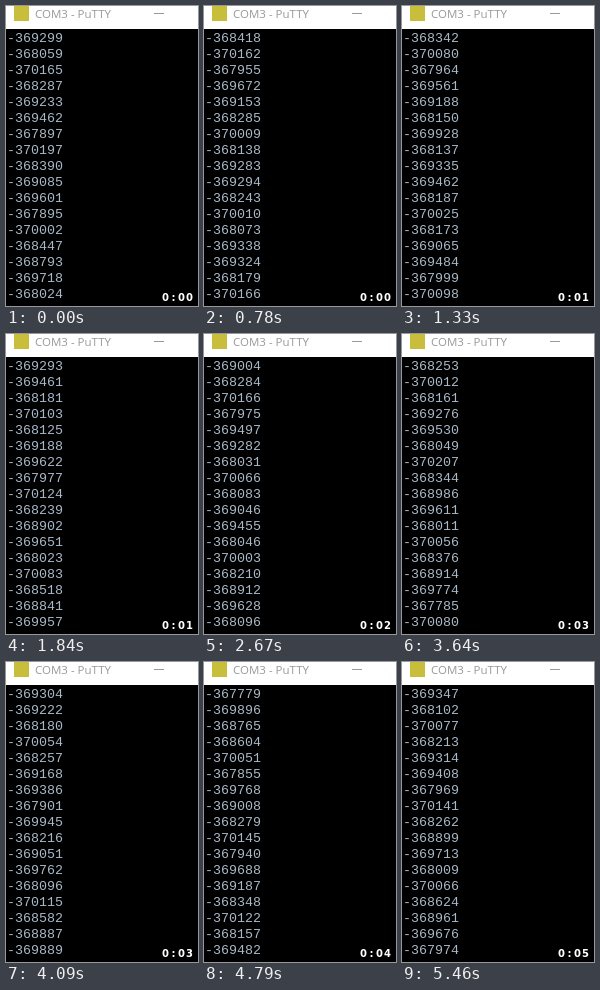
An HTML page for the animation above (5.56 s loop, 192 px wide and 300 px high).

```html
<!DOCTYPE html>
<html lang="en">
<head>
<meta charset="utf-8">
<title>Serial readout</title>
<style>
  html, body { margin: 0; width: 100%; height: 100%; overflow: hidden; background: #000; }
  svg { display: block; width: 192px; height: 300px; }
  text { white-space: pre; }
  .title { font: 11.5px "Open Sans", "Noto Sans", sans-serif; fill: #999; }
  .row { font: 13.333px "Liberation Mono", monospace; fill: #a9b8c6; }
  .clock { font: bold 10px "DejaVu Sans", sans-serif; fill: #fff; text-anchor: middle; }
</style>
</head>
<body>
<svg id="stage" viewBox="0 0 192 300">
  <rect width="192" height="300" fill="#000"/>
  <rect width="192" height="23" fill="#fff"/>
  <rect x="8" y="0" width="15" height="15" fill="#c9bd3c"/>
  <text class="title" x="29" y="12">COM3 - PuTTY</text>
  <rect x="148" y="7" width="10" height="1" fill="#999"/>
</svg>
<script>
const LOOP = 5560, STEP_MS = 30, LAST = 182, ROWS = 17;
const LINES_PER_MS = 0.08, CLOCK_MS = 1060, STALL_RATE = 0.1;

// Repeatable noise in [0, 1).
function noise(n) {
  const r = Math.sin(n * 12.9898 + 4.1) * 43758.5453;
  return r - Math.floor(r);
}

// Sensor value: mains hum aliased by the sample rate, plus noise.
function reading(n) {
  const hum = Math.cos(2 * Math.PI * (0.2 + 0.3945 * n));
  return Math.round(-369000 - 1080 * hum - 300 * (noise(n) - 0.5));
}

// First visible line per step; now and then the log stalls for one step.
const tops = [0];
for (let i = 1; i <= LAST; i++) {
  const stalled = i < LAST && noise(i + 0.5) < STALL_RATE;
  tops[i] = stalled ? tops[i - 1] : Math.floor(i * STEP_MS * LINES_PER_MS);
}

const stage = document.getElementById("stage");
function addText(cls, x, y) {
  const el = document.createElementNS("http://www.w3.org/2000/svg", "text");
  el.setAttribute("class", cls);
  el.setAttribute("x", x);
  el.setAttribute("y", y);
  return stage.appendChild(el);
}
const rows = Array.from({ length: ROWS }, (_, i) => addText("row", 1, 36 + 16 * i));
const clock = Array.from({ length: 4 }, (_, i) => addText("clock", 159.5 + 8 * i, 295));

let shown = -1;
function draw(ms) {
  const step = Math.min(LAST, Math.floor((ms % LOOP) / STEP_MS));
  if (step === shown) return;
  shown = step;
  rows.forEach((el, i) => { el.textContent = reading(tops[step] + i); });
  const label = "0:0" + Math.floor(step * STEP_MS / CLOCK_MS);
  clock.forEach((el, i) => { el.textContent = label[i]; });
}

const start = performance.now();
function tick() {
  draw(performance.now() - start);
  requestAnimationFrame(tick);
}
tick();
</script>
</body>
</html>
```
